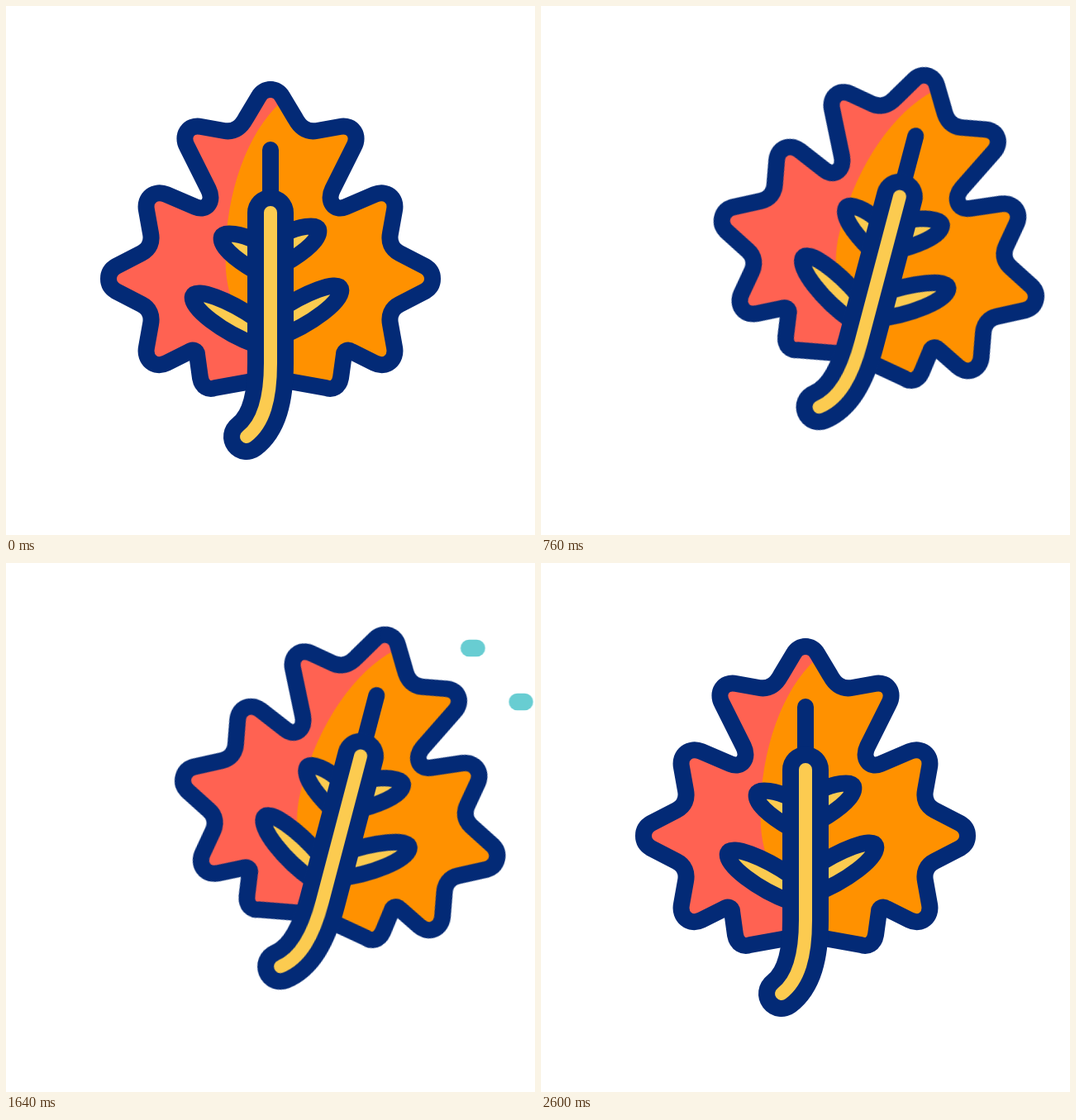
An HTML page without scripts that plays this animation: 640x640 px, repeating every 3 s.

```html
<!DOCTYPE html>
<html lang="en">
<head>
<meta charset="utf-8">
<title>Leaf in the wind</title>
<style>
  @property --drift { syntax: '<number>'; inherits: false; initial-value: 0; }
  @property --tip { syntax: '<number>'; inherits: false; initial-value: 0; }
  @property --tail { syntax: '<number>'; inherits: false; initial-value: 0; }

  html, body { margin: 0; width: 100%; height: 100%; overflow: hidden; background: #fff; }
  svg { display: block; width: 100vw; height: 100vh; }

  .drift, .tilt, .veins, .gust path {
    animation: 3s cubic-bezier(.33, 0, .67, 1) infinite;
  }

  /* Drift follows a cubic curve that dips a little, then climbs. */
  .drift {
    --u: var(--drift);
    animation-name: drift;
    transform: translate(
      calc(1px * var(--u) * (84 + var(--u) * (9 * var(--u) - 33))),
      calc(1px * var(--u) * (33 + var(--u) * (65 * var(--u) - 126))));
  }
  @keyframes drift {
    0%, 4.67% { --drift: 0; }
    22.5%, 51.33% { --drift: 1; }
    68.67%, 100% { --drift: 0; }
  }

  .tilt { animation-name: tilt; transform-origin: 320px 443px; }
  @keyframes tilt {
    0%, 6.67% { transform: rotate(0deg); }
    26.67% { transform: rotate(15deg); }
    38% { transform: rotate(6.5deg); }
    53.33% { transform: rotate(15deg); }
    73.33% { transform: rotate(-5deg); }
    86.67%, 100% { transform: rotate(0deg); }
  }

  /* The stem and veins slide slightly across the blade. */
  .veins { animation-name: slide; }
  @keyframes slide {
    0%, 8% { transform: translate(0, 0); }
    26.67%, 53.33% { transform: translate(5px, 1px); }
    73.33%, 100% { transform: translate(0, 0); }
  }

  .gust path {
    fill: none;
    stroke: #68cdd2;
    stroke-width: 20.5;
    stroke-linecap: round;
    stroke-dasharray: calc(1px * (var(--tip) - var(--tail))), 300px;
    stroke-dashoffset: calc(-1px * var(--tail));
    visibility: hidden;
  }
  .gust .curl { animation-name: curl; }
  .gust .line { animation-name: line; }
  .gust.back path { animation-delay: -1540ms; }
  @keyframes curl {
    0%, 4.67% { --tip: 0; visibility: hidden; }
    4.68%, 21.32% { visibility: visible; }
    15.33%, 100% { --tip: 100; }
    0%, 10.67% { --tail: 0; }
    21.33%, 100% { --tail: 100; visibility: hidden; }
  }
  @keyframes line {
    0%, 9.73% { --tip: 0; visibility: hidden; }
    9.74%, 24.99% { visibility: visible; }
    17.73%, 100% { --tip: 100; }
    0%, 17% { --tail: 0; }
    25%, 100% { --tail: 100; visibility: hidden; }
  }

  .ink { stroke: #032a76; stroke-width: 20; stroke-linecap: round; stroke-linejoin: round; }
  .leaflet { fill: #fccb50; }
  .stem { fill: none; stroke-linecap: round; }
</style>
</head>
<body>
<svg viewBox="0 0 640 640">
  <defs>
    <path id="half" d="M320 101A16 16 0 0 0 305.9 109.4L290 136C284 147 276 153 264 151L236 146C220 143 212 157 219 170L245 222C252 236 243 249 229 243L194 228C180 222 167 232 170 247L175 275C177 285 174 294 164 299L133 315C121 322 121 338 133 345L164 361C174 366 177 375 175 385L170 413C167 428 180 439 194 432L222 418C226 415 231 417 231 421L235 450C237 461 245 465 253 462L320 450"/>
    <clipPath id="blade">
      <use href="#half"/>
      <use href="#half" transform="matrix(-1 0 0 1 640 0)"/>
    </clipPath>
    <path id="small" d="M302 321C275 305 258 290 261 279C264 272 285 276 302 284"/>
    <path id="large" d="M302 410C262 395 222 365 226 351C230 340 270 356 302 378"/>
    <path id="stem" d="M320 250V432C320 475 312 505 291 521"/>
    <g id="wind">
      <path class="curl" pathLength="100" d="M84 103H163a40.5 40.5 0 0 0 0-81"/>
    </g>
  </defs>

  <g class="drift">
    <g class="tilt">
      <g clip-path="url(#blade)">
        <path fill="#ff6252" d="M100 80H540V480H100z"/>
        <path fill="#ff9100" d="M332 117C290 155 262 235 266 320C270 370 295 400 320 430V480H540V80H345z"/>
      </g>
      <g class="ink" fill="none">
        <use href="#half"/>
        <use href="#half" transform="matrix(-1 0 0 1 640 0)"/>
      </g>
      <g class="veins">
        <g class="ink leaflet">
          <path d="M320 174V250"/>
          <use href="#small"/>
          <use href="#large"/>
          <use href="#small" transform="matrix(-1 0 0 1 639 -9)"/>
          <use href="#large" transform="matrix(-1 0 0 1 631 -9)"/>
        </g>
        <use href="#stem" class="stem" stroke="#032a76" stroke-width="56"/>
        <use href="#stem" class="stem" stroke="#fccb50" stroke-width="16"/>
      </g>
    </g>
  </g>

  <g class="gust">
    <path class="curl" pathLength="100" d="M84 103H163a40.5 40.5 0 0 0 0-81"/>
    <path class="line" pathLength="100" d="M54 138.5H202"/>
    <path class="curl" pathLength="100" d="M26 168H105a40.5 40.5 0 0 1 0 80.5"/>
  </g>
  <g class="gust back" transform="matrix(-1 0 0 1 653.5 0)">
    <path class="curl" pathLength="100" d="M84 103H163a40.5 40.5 0 0 0 0-81"/>
    <path class="line" pathLength="100" d="M54 138.5H202"/>
    <path class="curl" pathLength="100" d="M26 168H105a40.5 40.5 0 0 1 0 80.5"/>
  </g>
</svg>
</body>
</html>
```
